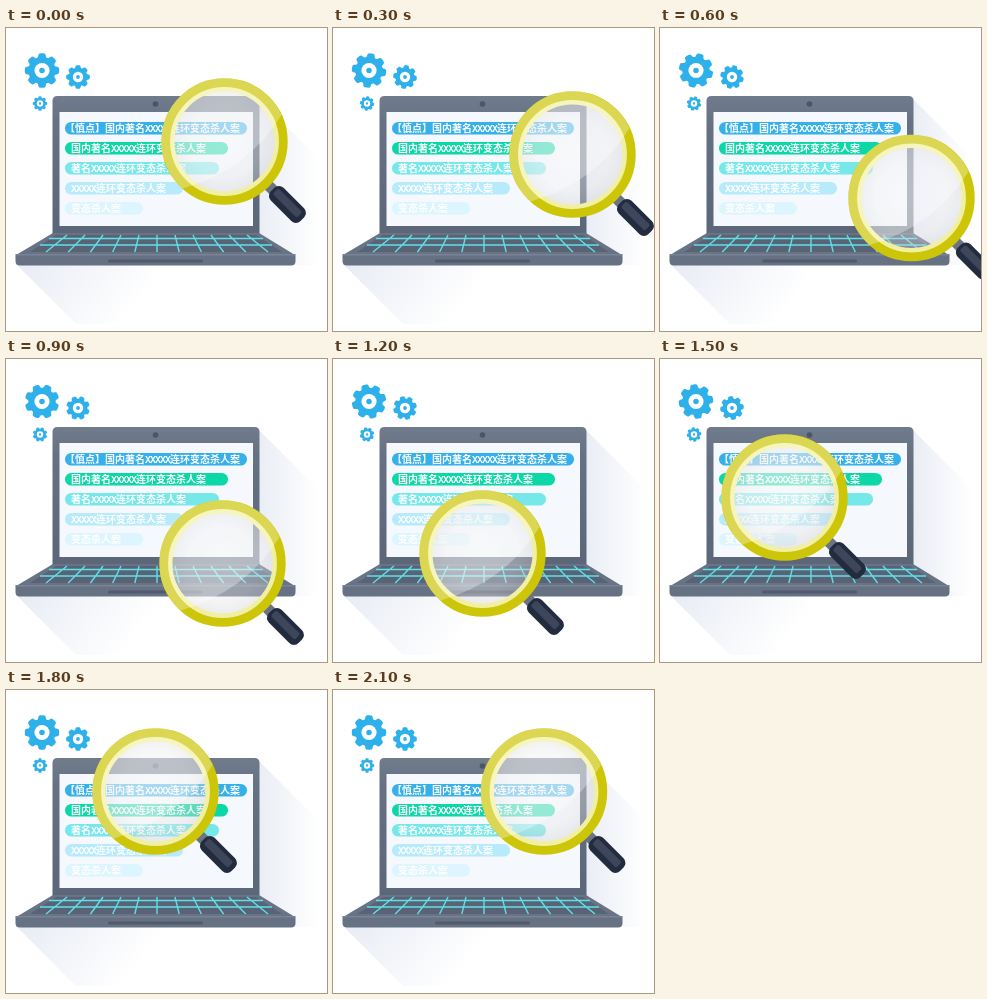
An HTML page that plays this animation: 321 px wide and 303 px high, repeating every 2400 ms.

```html
<!DOCTYPE html>
<html lang="zh">
<head>
<meta charset="utf-8">
<style>
html, body { margin: 0; width: 100%; height: 100%; overflow: hidden; background: #fff; }
svg { display: block; }
text { font: 600 10px "Noto Sans CJK SC", "Noto Sans CJK", sans-serif; fill: #fff; }
.latin { font: 700 10px "Liberation Mono", monospace; letter-spacing: -1px; }
</style>
</head>
<body>
<svg width="321" height="303" viewBox="0 0 321 303">
  <defs>
    <linearGradient id="right" gradientUnits="userSpaceOnUse" x1="250" x2="312" y1="0" y2="0">
      <stop stop-color="#e8ecf4"/><stop offset="1" stop-color="#fff"/>
    </linearGradient>
    <linearGradient id="below" gradientUnits="userSpaceOnUse" x1="20" y1="230" x2="110" y2="302">
      <stop stop-color="#e8ecf4"/><stop offset="1" stop-color="#fff"/>
    </linearGradient>
    <linearGradient id="lid" x2="0" y2="1">
      <stop stop-color="#707b8c"/><stop offset=".2" stop-color="#667183"/><stop offset="1" stop-color="#5b6678"/>
    </linearGradient>
    <radialGradient id="glass">
      <stop stop-color="#f2f2f3"/><stop offset=".7" stop-color="#e6e6e8"/><stop offset="1" stop-color="#cfcfd2"/>
    </radialGradient>
  </defs>

  <path fill="url(#below)" d="M10 236L70 296H321L289 236Z"/>
  <path fill="url(#right)" d="M252 70L312 130V237H289L252 207Z"/>

  <path fill="url(#lid)" d="M46.5 207V73Q46.5 68 51.5 68H248.5Q253.5 68 253.5 73V207Z"/>
  <path fill="#f5f8fd" d="M53.5 84H247V198H53.5Z"/>
  <circle cx="149.5" cy="76" r="2.8" fill="#4b5567"/>
  <g id="bars"></g>

  <path fill="#687386" d="M47 205H253L289 227H10Z"/>
  <path fill="#586376" d="M50 207H250L276 224H24Z"/>
  <path id="keys" fill="none" stroke="#60dfe7" stroke-width="1.4"/>
  <path fill="#667184" d="M9.5 226H289.5V233Q289.5 237.5 285 237.5H14Q9.5 237.5 9.5 233Z"/>
  <path fill="#788395" d="M10 226H289V227.5H10Z"/>
  <rect x="102" y="231.5" width="95" height="3" rx="1.5" fill="#505b6d"/>

  <g id="gears"></g>

  <g id="loupe">
    <g transform="rotate(45)">
      <rect x="61" y="-5.5" width="11" height="11" fill="#6b7485"/>
      <rect x="68" y="-9" width="42" height="18" rx="6.5" fill="#232b3f"/>
      <rect x="71" y="-5" width="34" height="8" rx="2" fill="#3d465b"/>
    </g>
    <circle r="52" fill="url(#glass)" opacity=".4"/>
    <circle r="52.5" fill="none" stroke="#f1f0a2" stroke-width="5"/>
    <circle r="58.8" fill="none" stroke="#cdc608" stroke-width="8.8"/>
    <path fill="#fff" opacity=".3" d="M-42 47A63 63 0 1 1 57 -26.5Q24 28 -42 47Z"/>
  </g>
</svg>
<script>
const $ = id => document.getElementById(id);

// top, width, colour, text start, label
const bars = [
  [94, 182, '#35b0e9', 59, '【慎点】国内著名XXXXX连环变态杀人案'],
  [114, 163, '#0bd8a6', 65, '国内著名XXXXX连环变态杀人案'],
  [134, 154, '#77e8ea', 65, '著名XXXXX连环变态杀人案'],
  [154, 118, '#b7ebfb', 65, 'XXXXX连环变态杀人案'],
  [174, 78, '#ddf5fe', 65, '变态杀人案']
];
$('bars').innerHTML = bars.map(([y, w, fill, x, label]) =>
  `<rect x="59" y="${y}" width="${w}" height="12.6" rx="6.3" fill="${fill}"/>
   <text x="${x}" y="${y + 10}">${label.replace('XXXXX', '<tspan class="latin">XXXXX</tspan>')}</text>`
).join('');

let keys = 'M43 210.5H257M34 217H266';
for (let i = -5; i <= 5; i++) keys += `M${151 + i * 18} 207L${151 + i * 22.2} 224`;
$('keys').setAttribute('d', keys);

// Unit cog with eight rounded teeth
const cog = Array.from({ length: 160 }, (_, i) => {
  const a = i * Math.PI / 80;
  const r = .89 + .11 * Math.tanh(2.5 * Math.cos(8 * a) + 1);
  return `${(r * Math.cos(a)).toFixed(3)},${(r * Math.sin(a)).toFixed(3)}`;
}).join(' ');

// centre and radius
const gears = [[36, 42.5, 17.2], [72, 49, 11.8], [34, 75.5, 7.2]];
$('gears').innerHTML = gears.map(([x, y, r]) =>
  `<g transform="translate(${x} ${y}) scale(${r})">
     <polygon class="gear" points="${cog}" fill="#2eb0ea"/>
     <circle r=".44" fill="#fff"/><circle r=".16" fill="#2eb0ea"/>
   </g>`
).join('');
const wheels = document.querySelectorAll('.gear');

// lens centre at each step
const stops = [
  [218.5, 113.5], [239.5, 126.5], [251.5, 170], [216.5, 204.5],
  [149.5, 194.5], [124.5, 138.5], [149.5, 101.5], [211, 101.5]
];

function draw(now) {
  const step = Math.floor(now % 2400 / 300);
  $('loupe').setAttribute('transform', `translate(${stops[step]})`);
  const turn = Math.min(step, 6) * 7.5;
  wheels.forEach(wheel => wheel.setAttribute('transform', `rotate(${turn})`));
}

const start = performance.now();
function tick() {
  draw(performance.now() - start);
  requestAnimationFrame(tick);
}
tick();
</script>
</body>
</html>
```
